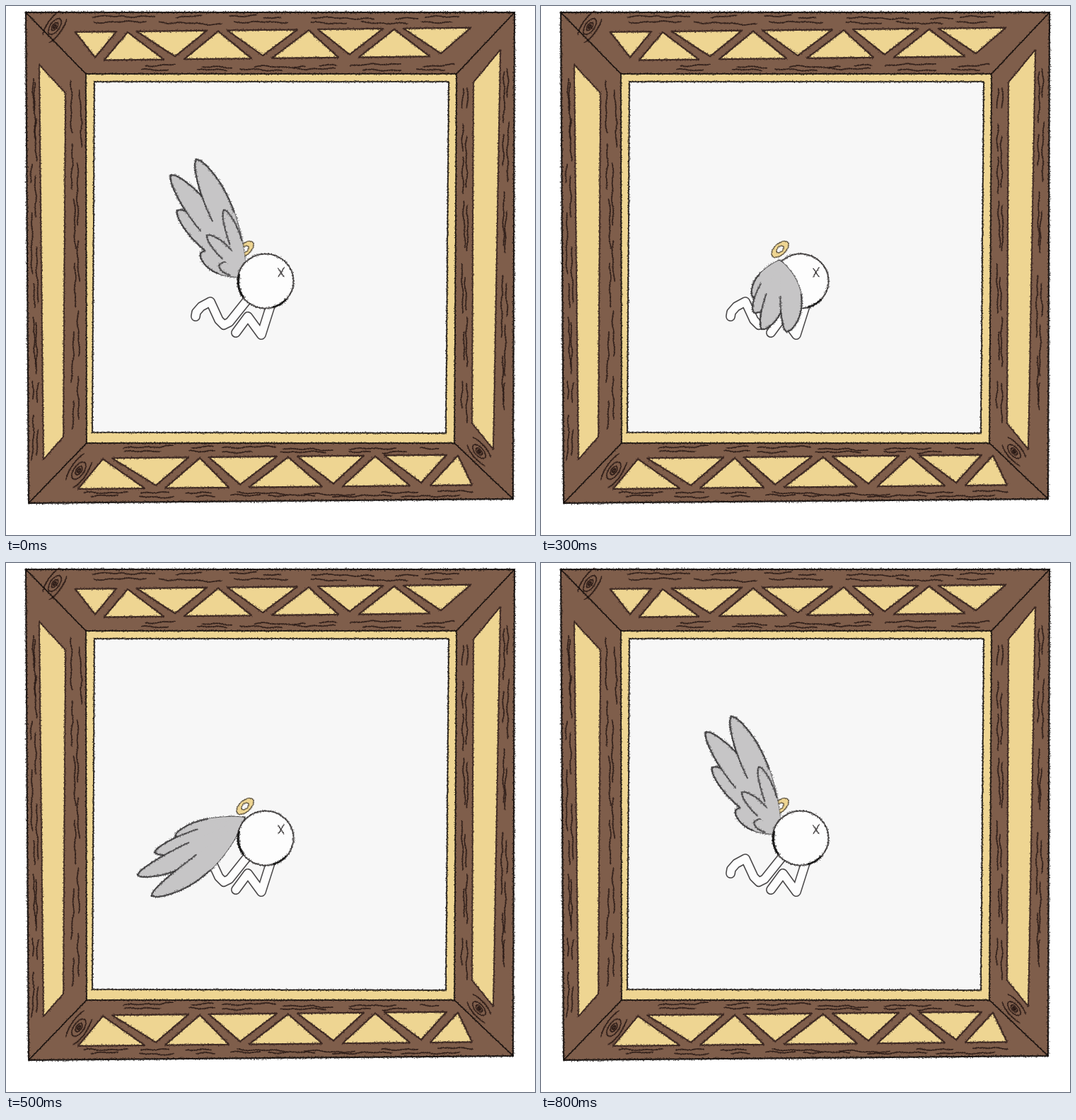
These frames come from a looping animation (748 px wide and 748 px high, 900 ms). An HTML page with a canvas:

```html
<!DOCTYPE html>
<html lang="en">
<head>
<meta charset="utf-8">
<title>Winged figure in a frame</title>
<style>
html, body { margin: 0; width: 100%; height: 100%; overflow: hidden; background: #fff; }
canvas { display: block; width: 748px; height: 748px; }
</style>
</head>
<body>
<canvas id="stage" width="748" height="748"></canvas>
<script>
const SIZE = 748, STEP = 100, TAU = Math.PI * 2;
const BROWN = '#7f5e4b', GOLD = '#eed592', PAPER = '#f7f7f7', SKIN = '#fdfdfd';
const WING = '#c6c5c6', INK = '#242122', BARK = '#35231f', EDGE = '#120d0c';

let seed = 7;
function rand() {
  seed = (seed * 1664525 + 1013904223) % 4294967296;
  return seed / 4294967296;
}
const jitter = r => (rand() + rand() - 1) * r;
const mix = (a, b, t) => a + (b - a) * t;
const loop = pts => [...pts, pts[0]];

function trace(g, pts) {
  g.beginPath();
  pts.forEach(([x, y], i) => i ? g.lineTo(x, y) : g.moveTo(x, y));
}

function fill(g, pts, color) {
  trace(g, pts);
  g.fillStyle = color;
  g.fill();
}

// Soft line with a grainy edge
function pencil(g, pts, width, color = INK, alpha = 0.65) {
  g.save();
  g.lineJoin = g.lineCap = 'round';
  g.strokeStyle = g.fillStyle = color;
  g.globalAlpha = alpha;
  g.lineWidth = width * 0.7;
  trace(g, pts);
  g.stroke();
  for (let i = 1; i < pts.length; i++) {
    const [x0, y0] = pts[i - 1], [x1, y1] = pts[i];
    const count = Math.hypot(x1 - x0, y1 - y0) * 1.5;
    for (let k = 0; k < count; k++) {
      const t = k / count;
      g.fillRect(mix(x0, x1, t) + jitter(width * 0.9) - 0.5,
                 mix(y0, y1, t) + jitter(width * 0.9) - 0.5, 1, 1);
    }
  }
  g.restore();
}

function panel(g, pts, color, width, ink) {
  fill(g, pts, color);
  pencil(g, loop(pts), width, ink, 0.85);
}

function arc(x, y, rx, ry, turn = 0, a0 = 0, a1 = TAU) {
  const pts = [], c = Math.cos(turn), s = Math.sin(turn);
  for (let i = 0; i <= 60; i++) {
    const a = mix(a0, a1, i / 60), u = rx * Math.cos(a), v = ry * Math.sin(a);
    pts.push([x + u * c - v * s, y + u * s + v * c]);
  }
  return pts;
}

// --- Picture frame ---

// Row of triangles, alternately pointing up and down; tips mark a zigzag
function triangles(g, tips, top, bottom, slope, up) {
  for (let i = 1; i < tips.length - 1; i++, up = !up) {
    const at = (x, y) => [x, y - (x - tips[0]) * slope];
    const tip = up ? top + 1 : bottom - 4, base = up ? bottom : top;
    panel(g, [at(tips[i], tip), at(tips[i - 1] + 13, base), at(tips[i + 1] - 16, base)],
      GOLD, 2.8, BARK);
  }
}

// Two lanes of wavy dashes along a board
function woodGrain(g, x0, y0, x1, y1, spread) {
  const len = Math.hypot(x1 - x0, y1 - y0), ux = (x1 - x0) / len, uy = (y1 - y0) / len;
  for (const side of [-0.6, 0.6]) {
    for (let pos = rand() * 30; pos < len - 25;) {
      const end = Math.min(len, pos + 25 + rand() * 65);
      const mid = side * spread + jitter(spread * 0.5), tilt = jitter(0.06), phase = rand() * TAU;
      const pts = [];
      for (let d = pos; d <= end; d += 2) {
        const off = mid + (d - pos) * tilt + 1.3 * Math.sin(d / 6 + phase) * Math.sin(d / 17);
        pts.push([x0 + ux * d - uy * off, y0 + uy * d + ux * off]);
      }
      pencil(g, pts, 1.6, '#2b1c19', 0.75);
      pos = end + 8 + rand() * 35;
    }
  }
}

// Nested rings with a long streak on either side
function knot(g, x, y, turn, size) {
  for (const k of [1, 0.5, 0.2]) pencil(g, arc(x, y, size * k, size * k * 0.5, turn), 1.5, '#2b1c19', 0.75);
  for (const side of [0.7, -0.7])
    pencil(g, arc(x, y + side * 3, size * 2, size * 0.75, turn, side, side * 3.6), 1.5, '#2b1c19', 0.75);
}

function drawFrame(g) {
  const outer = [[28, 9], [719, 9], [717, 697], [32, 703]];
  const inner = [[113, 96], [637, 96], [634, 618], [114, 618]];
  g.fillStyle = '#fff';
  g.fillRect(0, 0, SIZE, SIZE);
  panel(g, outer, BROWN, 2.8, EDGE);

  woodGrain(g, 100, 19, 685, 19, 6);
  woodGrain(g, 175, 88, 635, 87, 4);
  woodGrain(g, 140, 628, 612, 628, 5);
  woodGrain(g, 95, 691, 662, 690, 4);
  woodGrain(g, 39, 85, 42, 665, 4);
  woodGrain(g, 98, 95, 99, 600, 6);
  woodGrain(g, 649, 105, 648, 600, 5);
  woodGrain(g, 708, 75, 702, 575, 4);
  knot(g, 69, 29, -0.95, 13);
  knot(g, 103, 657, -0.95, 14);
  knot(g, 669, 630, 0.85, 12);

  triangles(g, [85, 126, 172, 239, 300, 363, 428, 486, 549, 615, 673], 37, 77, 0.011, false);
  triangles(g, [89, 137, 212, 274, 331, 399, 463, 522, 587, 639, 675], 640, 683, 0.01, true);
  panel(g, [[47, 83], [84, 123], [81, 609], [53, 641]], GOLD, 2.2, BARK);
  panel(g, [[699, 62], [661, 108], [659, 590], [689, 627]], GOLD, 2.2, BARK);
  panel(g, inner, GOLD, 2, EDGE);
  panel(g, [[125, 107], [626, 107], [622, 604], [122, 603]], PAPER, 2.2, EDGE);
  outer.forEach((pt, i) => pencil(g, [pt, inner[i]], 1.6, EDGE, 0.8));
}

// --- Wing ---

// Leaf shape along a bowed spine; returns its outline from start over the tip and back
function leaf([x0, y0], [x1, y1], width, bow, sharp) {
  const dx = x1 - x0, dy = y1 - y0, len = Math.hypot(dx, dy);
  const left = [], right = [];
  for (let i = 0; i <= 40; i++) {
    const t = i / 40, sag = 4 * bow * t * (1 - t);
    const slope = 4 * bow * (1 - 2 * t) / len, norm = Math.hypot(1, slope);
    const half = width * Math.sin(Math.PI * t ** (sharp ? 0.85 : 1.3)) ** (sharp ? 1.1 : 0.6) || 0;
    const point = h => {
      const u = len * t - h * slope / norm, v = sag + h / norm;
      return [x0 + (dx * u - dy * v) / len, y0 + (dy * u + dx * v) / len];
    };
    left.push(point(half));
    right.unshift(point(-half));
  }
  return [...left, ...right];
}

/* tips: feather ends, front one first; coverts: short feathers on top
   hang: feathers keep this direction instead of meeting at the root */
const UP = {
  root: [338, 382], width: 17, bow: 4, line: 3.1,
  tips: [[269, 217], [233, 239], [242, 289], [275, 350]],
  coverts: [[308, 288], [284, 324], [301, 367]]
};
const FOLDED = {
  root: [336, 374], width: 14, bow: 2, line: 2.9, hang: [26, 64], crease: 0,
  tips: [[289, 317], [263, 330], [256, 363]],
  coverts: [[296, 324]]
};
const DOWN = {
  root: [337, 360], width: 15, bow: -11, line: 2.8, front: true,
  tips: [[359, 530], [324, 531], [310, 493], [306, 456]],
  coverts: []
};
const SWEPT = {
  root: [348, 390], width: 15, bow: -45, fade: 0.12, line: 1.8, ink: '#929192', sharp: true, crease: 0.78,
  tips: [[227, 381], [233, 347], [257, 366], [268, 348], [279, 355]],
  coverts: []
};
const RISING = {
  root: [338, 387], width: 16, bow: -4, line: 2.3,
  tips: [[262, 270], [202, 271], [187, 315], [234, 368]],
  coverts: [[273, 337], [249, 350], [265, 380]]
};

// Turn and stretch a pose around its root
function bend(pose, turn, sx, sy) {
  const [ox, oy] = pose.root, c = Math.cos(turn), s = Math.sin(turn);
  const move = ([px, py]) => {
    const x = (px - ox) * sx, y = (py - oy) * sy;
    return [ox + x * c - y * s, oy + x * s + y * c];
  };
  return { ...pose, tips: pose.tips.map(move), coverts: pose.coverts.map(move) };
}

function drawWing(g, pose) {
  const { root, tips, coverts, hang, sharp, width, bow, line, fade = 0.3, crease = 0.5, ink = '#343233' } = pose;
  const feathers = tips.map((tip, i) => {
    const from = hang ? tip.map((v, j) => v + hang[j] * (1 - i * 0.1)) : root;
    return leaf(from, tip, width * (1 - i * 0.05), bow * (1 - i * fade), sharp);
  }).reverse();
  const small = coverts.map(tip => leaf(root, tip, hang ? width : 9, 2)).reverse();
  const all = hang ? [...small, ...feathers] : [...feathers, ...small];

  for (const pts of [...feathers, ...(hang ? small : [])]) pencil(g, pts, line, ink);
  for (const pts of all) {
    fill(g, pts, WING);
    const skip = Math.floor(pts.length / 2 * crease);
    pencil(g, pts.slice(skip, pts.length - skip), line * 0.9, ink);
  }
}

// --- Figure ---

function drawHalo(g) {
  const ring = arc(338, 344, 14.5, 8, -0.75), hole = arc(338, 344, 6, 3.6, -0.75);
  fill(g, ring, GOLD);
  fill(g, hole, PAPER);
  for (const pts of [ring, hole]) pencil(g, pts, 1.4, '#4f4535');
}

function limb(g, pts) {
  g.lineJoin = g.lineCap = 'round';
  for (const [width, color] of [[14, '#4b494a'], [10.8, SKIN]]) {
    trace(g, pts);
    g.lineWidth = width;
    g.strokeStyle = color;
    g.stroke();
  }
}

function drawLegs(g) {
  limb(g, [[374, 424], [361, 465], [342, 439], [325, 462]]);
  limb(g, [[340, 417], [316, 447], [308, 451], [301, 444], [289, 418], [276, 425], [269, 433], [268, 439]]);
}

function drawBody(g) {
  const body = arc(367, 389, 39.5, 38.5);
  fill(g, body, SKIN);
  pencil(g, body, 2.5, INK, 0.7);
  pencil(g, arc(369, 390, 40.5, 38, 0, 2.55, 3.4), 3.8, '#111', 0.85);
  pencil(g, arc(367, 389, 39.5, 38, 0, 0.75, 1.3), 2.8, '#111', 0.75);
}

function drawEye(g) {
  pencil(g, [[385, 371], [393, 383]], 1.4, INK, 0.75);
  pencil(g, [[393, 370], [385, 383]], 1.4, INK, 0.75);
}

function sheet(draw) {
  const c = document.createElement('canvas');
  c.width = c.height = SIZE;
  draw(c.getContext('2d'));
  return c;
}

const scene = sheet(drawFrame);

function figure(pose) {
  return sheet(g => {
    seed = 41;
    g.drawImage(scene, 0, 0);
    drawHalo(g);
    drawLegs(g);
    const parts = [drawWing, drawBody];
    if (pose.front) parts.reverse();
    for (const part of parts) part(g, pose);
    drawEye(g);
  });
}

const cycle = [
  UP,
  bend(UP, -0.18, 0.95, 0.7),
  FOLDED,
  bend(DOWN, 0.12, 1, 0.58),
  DOWN,
  { ...bend(DOWN, 1, 1, 1), front: false },
  SWEPT,
  RISING,
  UP
].map(figure);

const stage = document.getElementById('stage').getContext('2d');
const start = performance.now();
function render() {
  const time = Math.max(0, performance.now() - start);
  stage.drawImage(cycle[Math.floor(time / STEP) % cycle.length], 0, 0);
  requestAnimationFrame(render);
}
render();
</script>
</body>
</html>
```
